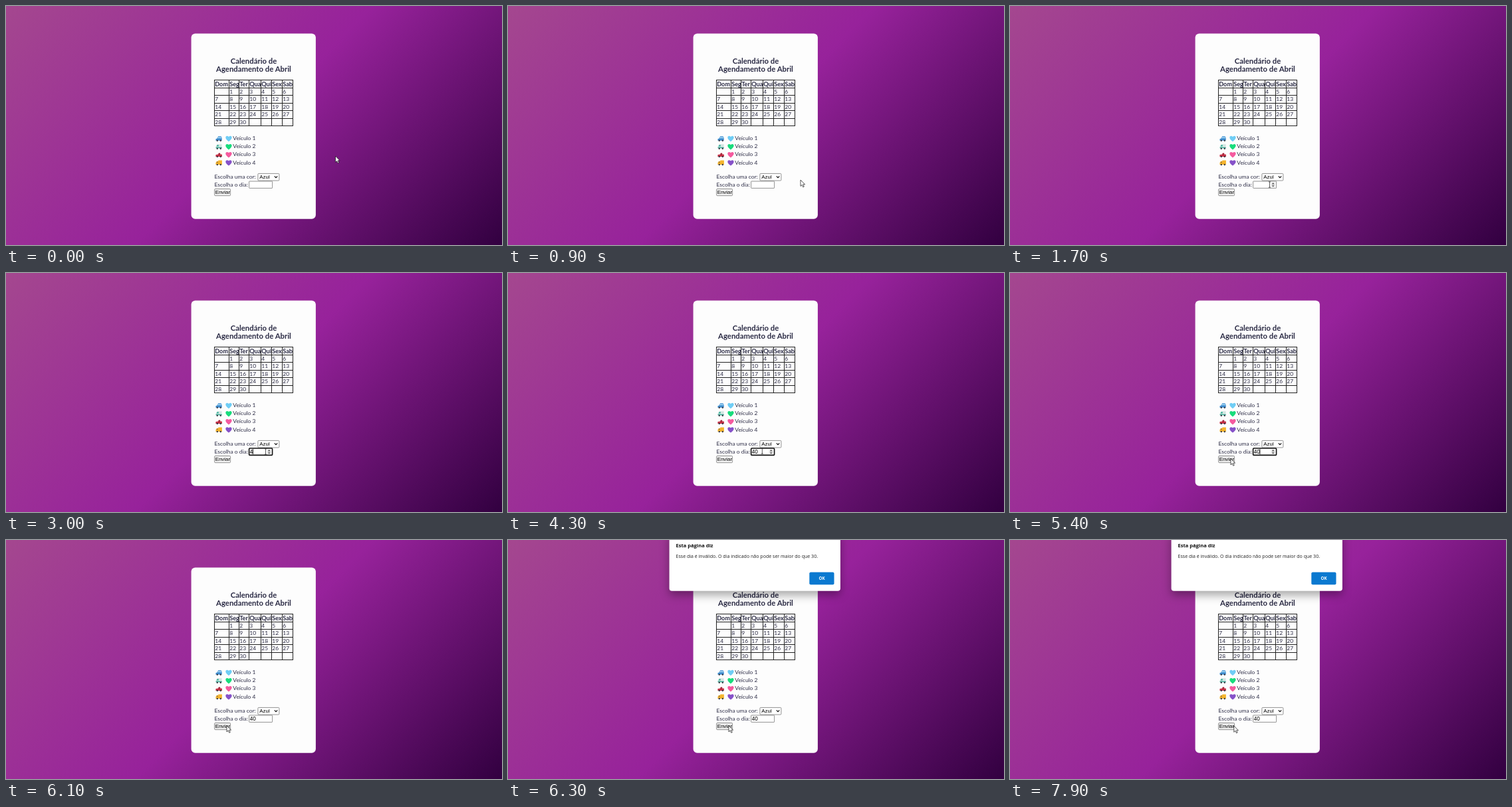
These frames come from a looping animation (746x360 px, 8000 ms). An HTML page:

```html
<!DOCTYPE html>
<html lang="pt">
<head>
<meta charset="utf-8">
<style>
html, body { margin: 0; width: 100%; height: 100%; overflow: hidden; }
body { background: linear-gradient(135deg, #a4478f, #97229b 50%, #320040); }
svg { display: block; }
text { font: 8.45px Lato, sans-serif; fill: #2b2b45; white-space: pre; }
.title { font-size: 11.35px; font-weight: 700; text-anchor: middle; }
.head { font-size: 9.2px; font-weight: 700; }
.ui { font: 7.9px "Liberation Sans", Arial, sans-serif; fill: #000; }
.dlg { font: 7.05px "Open Sans", sans-serif; fill: #222; }
.strong { font-size: 7.55px; font-weight: 700; fill: #111; }
.ok { font-size: 6.3px; font-weight: 700; fill: #fff; text-anchor: middle; }
.ctl { fill: #fff; stroke: #767676; stroke-width: .8; }
#dialog { filter: drop-shadow(0 6px 7px rgba(0, 0, 0, .35)); }
</style>
</head>
<body>
<svg width="746" height="360" viewBox="0 0 746 360">
  <rect x="278.6" y="41.6" width="187.3" height="279.1" rx="6" fill="#fdfdfd"/>
  <text class="title" x="372.5" y="86.6">Calendário de</text>
  <text class="title" x="372.5" y="98.6">Agendamento de Abril</text>
  <g id="table"></g>
  <g id="list"></g>

  <text x="313.5" y="260.3">Escolha uma cor:</text>
  <rect class="ctl" x="378.9" y="252.4" width="32" height="10.6" rx="1.2"/>
  <text class="ui" x="381.3" y="260.4">Azul</text>
  <path d="M403.8 256.3l2.2 2.3 2.2-2.3" fill="none" stroke="#111" stroke-width="1.2"/>

  <text x="313.5" y="271.9">Escolha o dia:</text>
  <rect id="field" x="365.6" y="264" width="35" height="10.4"/>
  <g id="spin">
    <rect x="392.3" y="265.3" width="6.8" height="7.8" fill="#efefef"/>
    <path d="M393.7 268.4l2-2.3 2 2.3zM393.7 270.2l2 2.3 2-2.3z" fill="#555"/>
  </g>
  <text class="ui" id="day" x="366.7" y="272.1" style="font-size:8.2px"></text>
  <path id="caret" d="M0 265.2v8" stroke="#000" stroke-width=".9"/>

  <rect class="ctl" id="send" x="313.6" y="275.5" width="24" height="10.2" rx="1.2"/>
  <text class="ui" x="314.7" y="283.3">Enviar</text>

  <g id="dialog">
    <rect x="242.6" y="-12" width="257.3" height="88.8" rx="4" fill="#fff"/>
    <text class="dlg strong" x="252.5" y="11.4">Esta página diz</text>
    <text class="dlg" x="252.5" y="27.3">Esse dia é inválido. O dia indicado não pode ser maior do que 30.</text>
    <rect x="453.3" y="48.4" width="37.2" height="18.8" rx="2" fill="#0b79d0"/>
    <text class="dlg ok" x="472" y="60.2">OK</text>
  </g>

  <path id="arrow" d="M0 0V9.4L2.2 7.4 3.7 10.8 5.3 10.1 3.8 6.8H6.6Z" fill="#fff" stroke="#111" stroke-width=".7"/>
  <path id="beam" d="M-1.7-4.2H1.7M-1.7 4.2H1.7M0-4.2V4.2" fill="none" stroke="#333" stroke-width=".8"/>
</svg>
<script>
const $ = id => document.getElementById(id);
const set = (el, attrs) => { for (const k in attrs) el.setAttribute(k, attrs[k]); };
const show = (id, on) => set($(id), { visibility: on ? 'visible' : 'hidden' });

// Calendar: April starting on a Monday
const cols = [313.5, 335.5, 350.5, 365.5, 383.5, 399.5, 415.5, 431.5];
const rowY = r => Math.floor(111.5 + r * 11.5) + .5;
let grid = '', cells = '';
cols.forEach(x => grid += `M${x} ${rowY(0)}V${rowY(6)}`);
for (let r = 0; r <= 6; r++) grid += `M313 ${rowY(r)}H432`;
['Dom', 'Seg', 'Ter', 'Qua', 'Qui', 'Sex', 'Sab'].forEach((d, i) =>
  cells += `<text class="head" x="${cols[i] + .7}" y="120.9">${d}</text>`);
for (let d = 1; d <= 30; d++)
  cells += `<text x="${cols[d % 7] + .8}" y="${rowY(Math.floor(d / 7) + 1) + 8.6}">${d}</text>`;
$('table').innerHTML = `<path d="${grid}" fill="none" stroke="#222"/>` + cells;

// Vehicles: heart colour, body colour, body shape, window colour, window shape
const vehicles = [
  ['#6fcdf5', '#3f8fd2', 'M0 4.6L2.4 3.6 3.6 .6H8L9.2 3.4V7H0Z', '#b9e4f7', 'M3.2 3.5L4.1 1.5H5.4V3.5ZM6 1.5H7.5L8.3 3.5H6Z'],
  ['#18dc7c', '#d3e6e2', 'M0 4L2 .4H9.2V7H0Z', '#2fae94', 'M1 3.8L2.4 1.4H4.2V3.8ZM.2 5H9.2V6.2H.2Z'],
  ['#f55a9f', '#c72f45', 'M0 4L3.4 3.6 4.4 1.6H6.6L7 3.6H9.4V7H0Z', '#6d2336', 'M4.3 3.5L5 2.2H6.1V3.5Z'],
  ['#8652c9', '#f5b52e', 'M0 4L1.6 1.8H3.8V.4H9.4V7H0Z', '#8a6a3a', 'M1 3.9L2 2.5H3.2V3.9Z']
];
const wheel = x => `<circle cx="${x}" cy="7" r="1.2" fill="#3b3d48"/>`;
$('list').innerHTML = vehicles.map(([heart, body, shape, glass, pane], i) => {
  const y = 199.5 + i * 12.1;
  return `<g transform="translate(315.5 ${y - 3.8})"><path d="${shape}" fill="${body}"/>
    <path d="${pane}" fill="${glass}"/>${wheel(2.3)}${wheel(7.3)}</g>
    <path transform="translate(330 ${y - 4.2})" d="M5 9C-3 3.5 1-1.8 5 1.6 9-1.8 13 3.5 5 9Z" fill="${heart}"/>
    <text x="341.3" y="${y + 2.7}">Veículo ${i + 1}</text>`;
}).join('');

// Pointer path: time, x, y
const path = [
  [0, 495.5, 226], [400, 495.5, 226], [700, 470, 246], [1000, 425, 270], [1300, 400, 279],
  [1500, 391, 269], [1700, 390.5, 269], [4200, 390.5, 269], [4500, 366, 266], [4900, 336.7, 270.5],
  [5100, 333.5, 277], [5400, 332, 279.5], [7800, 332, 279.5], [7900, 336.8, 280], [8000, 336.8, 280]
];
function pointer(t) {
  const i = path.findIndex(p => p[0] > t);
  const [t0, x0, y0] = path[i - 1], [t1, x1, y1] = path[i];
  const k = (t - t0) / (t1 - t0);
  return [x0 + (x1 - x0) * k, y0 + (y1 - y0) * k];
}
const within = (t, spans) => spans.some(([a, b]) => t >= a && t < b);

function draw(now) {
  const t = Math.floor(now % 8000 / 100) * 100;
  const [x, y] = pointer(t);
  const overField = x > 365.5 && x < 401 && y > 263.5 && y < 275;
  const overSend = x > 313 && x < 338 && y > 275.5 && y < 286;
  const focus = t >= 2000 && t < 6000;

  set($('field'), { fill: '#fff', stroke: focus ? '#101010' : '#767676', 'stroke-width': focus ? 1.6 : .8, rx: focus ? 1.2 : .6 });
  show('spin', overField || focus);
  $('day').textContent = t < 3000 ? '' : t < 3400 ? '4' : '40';
  set($('caret'), { transform: `translate(${t < 3000 ? 367 : t < 3400 ? 371.4 : 375.9} 0)` });
  show('caret', within(t, [[2000, 2500], [3000, 4000], [4500, 5000], [5400, 6000]]));
  $('send').style.fill = overSend ? '#ececec' : '#f3f3f3';
  show('dialog', t >= 6300);

  for (const id of ['arrow', 'beam']) {
    set($(id), { transform: `translate(${x} ${y})` });
    show(id, (id === 'beam') === overField);
  }
}
const start = performance.now();
(function tick() {
  draw(performance.now() - start);
  requestAnimationFrame(tick);
})();
</script>
</body>
</html>
```
